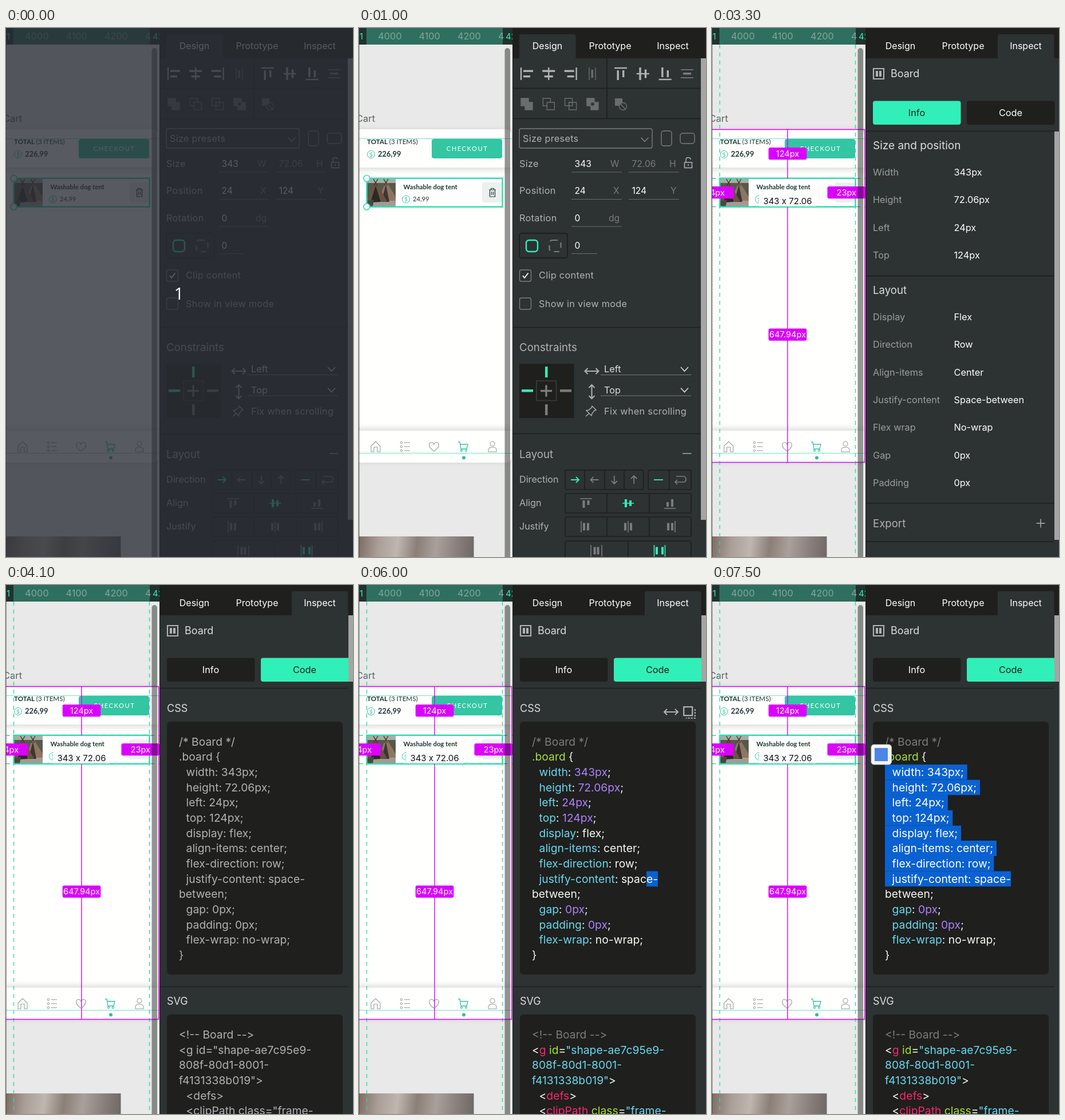
An HTML page with a canvas that plays this animation: 606 by 925 pixels, repeating every 8.3 s.

```html
<!DOCTYPE html>
<html lang="en">
<head>
<meta charset="utf-8">
<title>Inspect panel</title>
<style>
  html, body { margin: 0; width: 100%; height: 100%; overflow: hidden; background: #2d3233; }
  canvas { display: block; }
</style>
</head>
<body>
<canvas id="stage" width="606" height="925"></canvas>
<script>
const ctx = document.getElementById('stage').getContext('2d');
const LOOP = 8300;
const PANEL = '#2d3233', BLACK = '#1f1f1d', TEAL = '#31efb8', GREEN = '#34c5a3';
const WHITE = '#ffffff', LIGHT = '#dcddde', GRAY = '#b1b2b5', MID = '#7b7c7e', DIM = '#696d6e';
const MAGENTA = '#db00ff', BLUE = '#0a61d1';
const UI = 'Inter, sans-serif', SHOP = 'Lato, sans-serif';

// Drawing helpers
function box(x, y, w, h, color) { ctx.fillStyle = color; ctx.fillRect(x, y, w, h); }

function rounded(x, y, w, h, r, fill, stroke, width = 1.4) {
  ctx.beginPath();
  ctx.roundRect(x, y, w, h, r);
  if (fill) { ctx.fillStyle = fill; ctx.fill(); }
  if (stroke) { ctx.strokeStyle = stroke; ctx.lineWidth = width; ctx.stroke(); }
}

function fillPath(path, color) { ctx.fillStyle = color; ctx.fill(new Path2D(path)); }

function stroke(path, color, width = 1.4, x = 0, y = 0, angle = 0) {
  ctx.save();
  ctx.translate(x, y);
  ctx.rotate(angle);
  ctx.strokeStyle = color;
  ctx.lineWidth = width;
  ctx.stroke(new Path2D(path));
  ctx.restore();
}

function line(x1, y1, x2, y2, color, width = 1.4, dash = []) {
  ctx.setLineDash(dash);
  stroke(`M${x1} ${y1}L${x2} ${y2}`, color, width);
  ctx.setLineDash([]);
}

function disc(x, y, r, fill, edge, width) { rounded(x - r, y - r, 2 * r, 2 * r, r, fill, edge, width); }

// y is the middle of the capitals
function text(str, x, y, color = LIGHT, size = 16.3, { font = UI, weight = 400, align = 'left', gap = 0 } = {}) {
  ctx.font = `${weight} ${size}px ${font}`;
  ctx.letterSpacing = gap + 'px';
  ctx.textAlign = align;
  ctx.fillStyle = color;
  ctx.fillText(str, x, y + size * 0.36);
  const width = ctx.measureText(str).width;
  ctx.letterSpacing = '0px';
  return width;
}

const centered = { align: 'center' };
const spaced = { gap: 0.3 };

// Icons
function arrow(x, y, angle, color, half = 7) {
  stroke(`M${-half} 0H${half}M${half - 5} -5L${half} 0L${half - 5} 5`, color, 1.8, x, y, angle);
}

function doubleArrow(x, y, angle, color) {
  stroke('M-12 0H12M-7 -5L-12 0L-7 5M7 -5L12 0L7 5', color, 2, x, y, angle);
}

function chevron(x, y, color) { stroke('M-6.5 -3.5L0 3.5L6.5 -3.5', color, 1.6, x, y); }

function alignIcon(x, y, side, vertical, color) {
  ctx.save();
  ctx.translate(x, y);
  if (vertical) ctx.transform(0, 1, 1, 0, 0, 0);
  box(side * 10 - 1.2, -11, 2.4, 22, color);
  const bar = (len, top) => box(side ? (side < 0 ? -6 : 6 - len) : -len / 2, top, len, 3.4, color);
  bar(side ? 17 : 22, -6.5);
  bar(side ? 12 : 15, 3);
  ctx.restore();
}

function boolIcon(x, y, kind) {
  const back = kind === 0 || kind === 3, front = kind !== 2;
  rounded(x - 10, y - 10, 13, 13, 0, back ? DIM : null, DIM);
  rounded(x - 3, y - 3, 13, 13, 0, front && kind !== 1 ? DIM : PANEL, DIM);
  if (kind === 2) rounded(x - 3, y - 3, 6, 6, 0, null, DIM);
  if (kind === 3) box(x - 2.5, y - 2.5, 5, 5, PANEL);
}

function copyIcon(x, y, color) {
  rounded(x + 1.2, y + 1.2, 15, 15, 0, null, color, 2.2);
  ctx.setLineDash([3, 2]);
  stroke('M20.8 5V20.8H5', color, 2, x, y);
  ctx.setLineDash([]);
}

function coin(x, y, r) {
  disc(x, y, r, null, GREEN, 1);
  text('$', x, y, GREEN, r * 1.5, { font: SHOP, align: 'center' });
}

// Left side: the design canvas
function tentPhoto() {
  ctx.save();
  ctx.beginPath();
  ctx.rect(14, 264, 50, 48);
  ctx.clip();
  box(14, 264, 50, 48, '#55594c');
  box(14, 264, 50, 7, '#a9aca2');
  box(14, 298, 50, 14, '#a39a94');
  fillPath('M47 267L68 302H34Z', '#8d765f');
  fillPath('M47 274L53 304H39Z', '#3a3632');
  fillPath('M29 268L49 303L12 305Z', '#6b5240');
  fillPath('M29 276L38 304L20 305Z', '#2b2827');
  fillPath('M14 303L26 300L24 312H14Z', '#4a4645');
  for (const x of [29, 47]) stroke('M-4 -5L3 7M4 -5L-3 7', '#40352d', 1.3, x, 269);
  ctx.restore();
}

function bottomPhoto() {
  const g = ctx.createLinearGradient(0, 900, 200, 925);
  ['#7f6e65', '#aa9e98', '#bfb6b0', '#8b7f77', '#aaa09b', '#8b817e', '#6f6865']
    .forEach((color, i) => g.addColorStop(i / 6, color));
  box(0, 889, 200.5, 36, g);
}

function ruler() {
  box(0, 0, 268, 29, '#20332e');
  box(13, 0, 238, 29, '#2f6f5f');
  ['4000', '4100', '4200'].forEach((n, i) => text(n, 54 + i * 69.2, 14, '#83a69c', 16.3, centered));
  text('4', 243, 14, '#83a69c');
  text('1', 1, 15, TEAL, 15);
  text('42', 256, 15, TEAL, 15);
}

function navIcons() {
  const c = '#9a9d9c';
  stroke('M-8 -1L0 -9L8 -1V9H3V1H-3V9H-8Z', c, 1.1, 29, 732);
  for (const dy of [-7, 0, 7]) {
    disc(74, 732 + dy, 1.8, null, c, 1);
    line(79, 732 + dy, 89, 732 + dy, c, 1.1);
  }
  stroke('M0 8C-13 -1 -8 -8 -4 -7.5Q-1 -7 0 -4Q1 -7 4 -7.5C8 -8 13 -1 0 8Z', c, 1.1, 131, 732);
  stroke('M-9 -8H-6L-4 4H6L8 -4H-5', GREEN, 1.3, 182, 732);
  disc(179, 739, 1.6, null, GREEN, 1.1);
  disc(187, 739, 1.6, null, GREEN, 1.1);
  disc(233, 727, 4, null, c, 1.1);
  stroke('M-7 9V6Q-7 1 0 1Q7 1 7 6V9Z', c, 1.1, 233, 732);
  disc(183, 751.5, 3, '#33bda1');
}

function shadowBox(x, y, w, h, radii, dy) {
  ctx.save();
  ctx.shadowColor = 'rgba(0,0,0,.16)';
  ctx.shadowBlur = 12;
  ctx.shadowOffsetY = dy;
  rounded(x, y, w, h, radii, '#fffffe');
  ctx.restore();
}

function workspace(measuring) {
  ctx.save();
  ctx.beginPath();
  ctx.rect(0, 0, 268, 925);
  ctx.clip();
  box(0, 0, 268, 925, '#e8e9e8');
  text('Cart', -5, 158, '#5f6364', 16.5);
  rounded(-20, 177, 286, 583, 9, '#fffffe');
  shadowBox(-20, 177, 286, 67, [0, 9, 0, 0], 3);
  shadowBox(-20, 704, 286, 56, [0, 0, 9, 0], -3);

  const ink = '#1d3733';
  const shop = { font: SHOP }, bold = { font: SHOP, weight: 700 };
  const total = text('TOTAL ', 14, 198.5, ink, 11.6, bold);
  text('(3 ITEMS)', 14 + total, 198.5, ink, 11.6, shop);
  coin(21, 221, 6.5);
  text('226,99', 33, 220, ink, 12.9, bold);
  rounded(127, 194, 123, 34, 4, GREEN);
  text('CHECKOUT', 189, 211, WHITE, 11.2, { font: SHOP, align: 'center', gap: 1.5 });

  tentPhoto();
  text('Washable dog tent', 77.5, 277.5, ink, 11.3, bold);
  coin(82, 299.5, 6.5);
  text('24,99', 94, 298.5, ink, 11.2, shop);
  rounded(215, 270, 35, 35, 4, '#ecf0ee');
  stroke('M-6 -5H6M-2.5 -5V-7.5H2.5V-5M-4.5 -5V7H4.5V-5M-1.5 -2V4M1.5 -2V4', ink, 1.2, 233, 288);
  navIcons();
  bottomPhoto();

  line(0, 193.5, 268, 193.5, '#6fe3c6', 1);
  line(0, 743.5, 268, 743.5, '#6fe3c6', 1);
  rounded(13.5, 262.8, 237, 50, 0, null, '#2fe0b0', 2.4);
  if (measuring) measures();
  else for (const y of [263, 312.5]) disc(13.5, y, 5.5, WHITE, '#2fe0b0', 1.6);

  rounded(254.5, 35, 9.5, 900, 5, 'rgba(30,33,30,.48)');
  ruler();
  box(0, 0, 1, 925, 'rgba(40,50,50,.5)');
  ctx.restore();
}

function measures() {
  const dash = [7, 7], guide = '#35d6ac';
  for (const x of [13.5, 250.5]) line(x, 29, x, 925, guide, 1.4, dash);
  for (const y of [263, 312.5]) line(0, y, 268, y, guide, 1.4, dash);
  rounded(82, 292, 100, 20, 2, 'rgba(255,255,255,.88)');
  text('343 x 72.06', 132, 302.5, '#111', 15, centered);

  rounded(-20, 177.5, 286.5, 582, 0, null, MAGENTA);
  line(132, 177, 132, 263, MAGENTA);
  line(132, 313, 132, 760, MAGENTA);
  line(0, 288, 13, 288, MAGENTA);
  line(251, 288, 266, 288, MAGENTA);
  [['124px', 98.7, 209], ['647.94px', 98.7, 525.5], ['23px', 201.5, 277], ['24px', -28.5, 277]].forEach(([label, x, y]) => {
    rounded(x, y, 66.7, 21.3, 3, MAGENTA);
    text(label, x + 33.3, y + 10.5, WHITE, 14.6, centered);
  });
}

// Right side: shared frame
function panelFrame(active) {
  box(268, 0, 338, 925, PANEL);
  box(268, 0, 338, 53, BLACK);
  rounded(active ? 499 : 280, 11, 98.5, 43, [3, 3, 0, 0], PANEL);
  [['Design', 329], ['Prototype', 438.5], ['Inspect', 548]].forEach(([name, x]) => text(name, x, 31.5, WHITE, 16, centered));
  box(268, 0, 1, 925, '#1f2122');
}

function divider(y, right = 598) { line(269, y, right, y, BLACK, 1.6); }

function thumb(y1, y2) { box(598, y1, 8, y2 - y1, '#a4a6a5'); }

// A black framed row of buttons, split at the given x positions
function segments(x, y, w, splits) {
  rounded(x, y, w, 34, 3, null, BLACK, 1.6);
  splits.forEach(s => line(s, y, s, y + 34, BLACK, 1.6));
}

function field(label, x, y, value, unit, unitX, color = WHITE) {
  if (label) text(label, 280, y, GRAY, 16.3, spaced);
  text(value, x + 5.5, y, color, 15.6);
  text(unit, unitX, y, MID, 15.6);
  line(x, y + 15, x + 88, y + 15, DIM, 1);
}

function layoutIcon(x, y, lines, bars, color, vertical) {
  ctx.save();
  ctx.translate(x, y);
  if (vertical) ctx.transform(0, 1, 1, 0, 0, 0);
  lines.forEach(p => box(p - 0.8, -10, 1.6, 20, color));
  bars.forEach(([p, top, len, w = 4]) => box(vertical ? p : p - w / 2, top, vertical ? len : w, vertical ? w : len, color));
  ctx.restore();
}

function designPanel(hover) {
  panelFrame(0);
  if (hover) box(hover === 1 ? 438 : 477, 60, 39, 40, TEAL);
  [-1, 0, 1].forEach((side, i) => {
    alignIcon(293 + i * 38.3, 80, side, false, GRAY);
    alignIcon(457 + i * 38.8, 80, side, true, hover === i + 1 ? BLACK : GRAY);
  });
  for (const x of [402, 413]) box(x - 0.7, 69, 1.4, 22, DIM);
  box(405.5, 73, 3.5, 14, DIM);
  for (const y of [73, 87]) box(562, y - 0.8, 22, 1.6, MID);
  box(566, 78, 14, 3.5, MID);
  divider(105.5); divider(158.5);
  line(433, 53, 433, 158, BLACK, 1.6);
  for (let i = 0; i < 4; i++) boolIcon(293 + i * 38.3, 133, i);
  rounded(447, 123, 13, 13, 0, DIM);
  disc(461, 137, 6.5, PANEL, DIM);
  line(448, 123, 466, 143, DIM, 1.6);

  rounded(280, 176, 232, 34, 3, null, MID);
  text('Size presets', 286, 193, GRAY, 16.2, spaced);
  chevron(499, 195, MID);
  rounded(528, 180, 18, 26, 4, null, MID);
  rounded(561, 184, 25, 18, 4, null, MID);
  field('Size', 371, 237, '343', 'W', 439);
  field('', 471, 237, '72.06', 'H', 542, MID);
  stroke('M-6.5 -1H6.5V8.5H-6.5ZM-4 -1V-6Q-4 -9.5 0 -9.5Q4 -9.5 4 -6M0 2V5', GRAY, 1.5, 575, 236);
  field('Position', 371, 284.5, '24', 'X', 444);
  field('', 471, 284.5, '124', 'Y', 544);
  field('Rotation', 371, 332, '0', 'dg', 436);
  rounded(280, 359, 84, 43, 4, null, BLACK, 1.8);
  rounded(292, 371, 20, 20, 5, null, TEAL, 2.4);
  ctx.setLineDash([9.5, 7]);
  rounded(332.5, 371, 20, 20, 5, null, MID, 2.2);
  ctx.setLineDash([]);
  text('0', 376.5, 380.5, WHITE, 15.6);
  line(371, 394.5, 416, 394.5, DIM, 1);

  for (const y of [433, 482]) rounded(280.5, y - 10, 20, 20, 3, null, MID);
  stroke('M-4.5 0L-1.5 4L5 -4.5', WHITE, 1.8, 290.5, 433);
  text('Clip content', 314, 432.5, GRAY, 16.3, spaced);
  text('Show in view mode', 314, 482, GRAY, 16.3, spaced);
  divider(523.5);

  text('Constraints', 280, 558, GRAY, 18.7);
  box(280, 587, 95.5, 95, BLACK);
  rounded(310, 617, 34.5, 34.5, 0, null, '#353838', 2);
  box(317, 632.8, 20, 3.4, MID);
  box(325.3, 624.5, 3.4, 20, MID);
  box(325, 592, 4.5, 19, TEAL);
  box(284, 632, 20, 4.5, TEAL);
  box(351, 632, 20, 4.5, MID);
  box(325, 658, 4.5, 19, MID);
  doubleArrow(406.5, 600, 0, GRAY);
  doubleArrow(406.5, 636, Math.PI / 2, GRAY);
  [['Left', 596.5], ['Top', 633]].forEach(([name, y]) => {
    text(name, 428, y, LIGHT);
    chevron(568.5, y, LIGHT);
    line(422, y + 10, 580, y + 10, MID, 1);
  });
  stroke('M2 -9L9 -2L6 -1L2 4L1 8L-8 -1L-4 -2L1 -6ZM-3 4L-9 9', GRAY, 1.4, 405, 670);
  text('Fix when scrolling', 428, 670.5, GRAY, 16.3, spaced);
  divider(709.5);

  text('Layout', 280, 745, GRAY, 18.6);
  line(565, 744, 580.5, 744, GRAY);
  [['Direction', 789.5], ['Align', 830.5], ['Justify', 871.5]].forEach(([name, y]) => text(name, 280, y, GRAY, 16.2));
  segments(360, 773, 137, [394, 429, 463]);
  segments(505, 773, 75, [542]);
  segments(360, 814, 220, [433, 507]);
  segments(360, 855, 220, [433, 507]);
  segments(360, 897, 220, [470]);
  [0, 2, 1, 3].forEach((turn, i) => arrow(377 + i * 34.4, 790, turn * Math.PI / 2, i ? MID : TEAL));
  line(515, 790, 531, 790, TEAL, 1.8);
  stroke('M-7 -6H5Q10 -6 10 -1Q10 4 5 4H-9M-5 0L-9 4L-5 8', MID, 1.7, 561, 790);
  layoutIcon(396.5, 831, [-8], [[-5, -6, 13], [-5, 2, 8]], MID, true);
  layoutIcon(470, 831, [0], [[-7, -6, 14], [-5, 2, 10]], TEAL, true);
  layoutIcon(543, 832, [8], [[-3, -6, 8], [-8, 2, 13]], MID, true);
  const tall = p => [p, -6.5, 13];
  layoutIcon(395, 872, [-7], [tall(-2), tall(5)], MID);
  layoutIcon(470, 872, [0], [tall(-5), tall(5)], MID);
  layoutIcon(545, 872, [7], [tall(-5), tall(2)], MID);
  layoutIcon(414.5, 914, [-9.5, 9.5], [tall(-3), tall(3)], MID);
  layoutIcon(525, 914, [-9.5, 9.5], [tall(-5), tall(5)], TEAL);
  box(597, 53, 9, 807, '#a4a6a5');
}

function inspectHead(codeActive) {
  panelFrame(1);
  rounded(282, 71, 18, 18, 0, null, GRAY, 2.2);
  box(286, 75, 4, 10, GRAY);
  box(292, 75, 4, 10, GRAY);
  text('Board', 312, 80, LIGHT, 18);
  [['Info', 281], ['Code', 445]].forEach(([name, x], i) => {
    const on = codeActive === !!i;
    rounded(x, 127.5, 153.5, 41.5, i && codeActive ? [4, 0, 0, 4] : 4, on ? TEAL : BLACK);
    text(name, x + 76.5, 148, on ? BLACK : WHITE, 16.3, centered);
  });
  divider(180.5);
}

const SIZE_ROWS = [['Width', '343px'], ['Height', '72.06px'], ['Left', '24px'], ['Top', '124px']];
const LAYOUT_ROWS = [['Display', 'Flex'], ['Direction', 'Row'], ['Align-items', 'Center'],
  ['Justify-content', 'Space-between'], ['Flex wrap', 'No-wrap'], ['Gap', '0px'], ['Padding', '0px']];

function infoPanel(t) {
  inspectHead(false);
  const rows = (list, y) => list.forEach(([name, value], i) => {
    text(name, 281, y + i * 48.3, '#9b9ea0', 16.3);
    text(value, 422.5, y + i * 48.3, WHITE, 16.3);
  });
  text('Size and position', 281, 205, LIGHT, 19);
  rows(SIZE_ROWS, 252.3);
  divider(433.5);
  text('Layout', 281, 458, LIGHT, 18.6);
  rows(LAYOUT_ROWS, 505.3);
  divider(831);
  text('Export', 281, 866, GRAY, 18.6);
  stroke('M-7.5 0H7.5M0 -7.5V7.5', GRAY, 1.4, 574, 866);
  divider(898);
  thumb(181, 895);
  if (t >= 2600 && t < 3000) copyIcon(566, 196, t >= 2700 && t < 2900 ? TEAL : GRAY);
  if (t >= 3000 && t < 3300) copyIcon(566, 246, t >= 3100 && t < 3200 ? TEAL : GRAY);
}

// Code tokens: "~" followed by a colour key; split dashes keep the font from joining "-->" into an arrow
const SYNTAX = { c: '#7c7c78', s: '#a6e22e', p: '#66d9ef', n: '#ae81ff', w: '#f8f8f2', t: '#f92672' };
const declaration = (name, value, end = ';') => `  ~p${name}~w: ~${/^\d/.test(value) ? 'n' : 'w'}${value}~w${end}`;
const CSS_LINES = ['~c/* Board */', '~s.board ~w{',
  ...SIZE_ROWS.map(([name, value]) => declaration(name.toLowerCase(), value)),
  declaration('display', 'flex'), declaration('align-items', 'center'), declaration('flex-direction', 'row'),
  declaration('justify-content', 'space-', ''), '~wbetween;',
  declaration('gap', '0px'), declaration('padding', '0px'), declaration('flex-wrap', 'no-wrap'), '~w}'];
const SVG_LINES = ['~c<!-- Board -~c-~c>', '~w<~tg ~sid~w=~p"shape-ae7c95e9-', '~p808f-80d1-8001-', '~pf4131338b019"~w>',
  '  ~w<~tdefs~w>', '  ~w<~tclipPath ~sclass~w=~p"frame-'];
const CODE_X = 302, CODE_SIZE = 19.3, INDENT = 12.6, LEADING = 26.65, CSS_Y = 273.8, LAST_ROW = 9;

function codeLine(source, y, override) {
  let x = CODE_X + (source.startsWith(' ') ? INDENT : 0);
  for (const token of source.trimStart().split('~').slice(1)) {
    x += text(token.slice(1), x, y, override || SYNTAX[token[0]], CODE_SIZE);
  }
  return x;
}

// Start of the selection as [time, row, characters left out]
const SELECTION = [[6000, 9, 21], [6100, 8, 11], [6200, 7, 7], [6300, 6, 4], [6400, 5, 0], [6600, 4, 0], [6700, 3, 0], [6900, 2, 0]];

function drawSelection(t) {
  const step = SELECTION.filter(s => t >= s[0]).pop();
  if (!step) return;
  const [, first, skip] = step;
  for (let row = first; row <= LAST_ROW; row++) {
    const source = CSS_LINES[row], y = CSS_Y + row * LEADING;
    const plain = source.trimStart().replace(/~./g, '');
    ctx.font = `400 ${CODE_SIZE}px ${UI}`;
    const width = ctx.measureText(plain).width;
    const skipped = row === first && skip ? INDENT + ctx.measureText(plain.slice(0, skip)).width : 0;
    const left = CODE_X + skipped;
    const right = CODE_X + INDENT + width + (row < LAST_ROW ? 6 : 0);
    ctx.save();
    ctx.beginPath();
    ctx.rect(left, y - LEADING / 2, right - left, LEADING + 0.4);
    ctx.clip();
    box(left, y - LEADING / 2, right - left, LEADING + 0.4, BLUE);
    codeLine(source, y, WHITE);
    ctx.restore();
  }
}

function codePanel(t) {
  inspectHead(true);
  const plain = t < 4200 ? GRAY : null;
  text('CSS', 281, 215.5, LIGHT, 18);
  rounded(281, 239, 307, 442, 6, BLACK);
  CSS_LINES.forEach((source, i) => codeLine(source, CSS_Y + i * LEADING, plain));
  drawSelection(t);
  divider(702.5);
  text('SVG', 281, 727.5, LIGHT, 18);
  rounded(281, 751, 307, 200, 6, BLACK);
  SVG_LINES.forEach((source, i) => codeLine(source, 786 + i * LEADING, plain));
  thumb(53, 169);
  if (t >= 4600 && t < 7500) {
    doubleArrow(545, 222, 0, t >= 4700 && t < 4800 ? TEAL : GRAY);
    copyIcon(566, 212, GRAY);
  }
  if (t >= 7300) {
    rounded(278, 279, 35.5, 35, 5, '#f4f4f4', '#c9cacb', 0.8);
    box(284, 285, 23, 23, '#4a86e8');
  }
}

function draw(t) {
  ctx.clearRect(0, 0, 606, 925);
  workspace(t >= 1800);
  if (t < 1800) designPanel(t >= 800 && t < 900 ? 1 : t >= 900 && t < 1000 ? 2 : 0);
  else if (t < 4100) infoPanel(t);
  else codePanel(t);
  if (t < 100) {
    box(0, 0, 606, 925, 'rgba(40,44,52,.78)');
    text('1', 302, 464, WHITE, 30, { font: '"Open Sans", sans-serif', align: 'center' });
  }
}

function frame(now) {
  draw(now % LOOP);
  requestAnimationFrame(frame);
}
requestAnimationFrame(frame);
</script>
</body>
</html>
```
